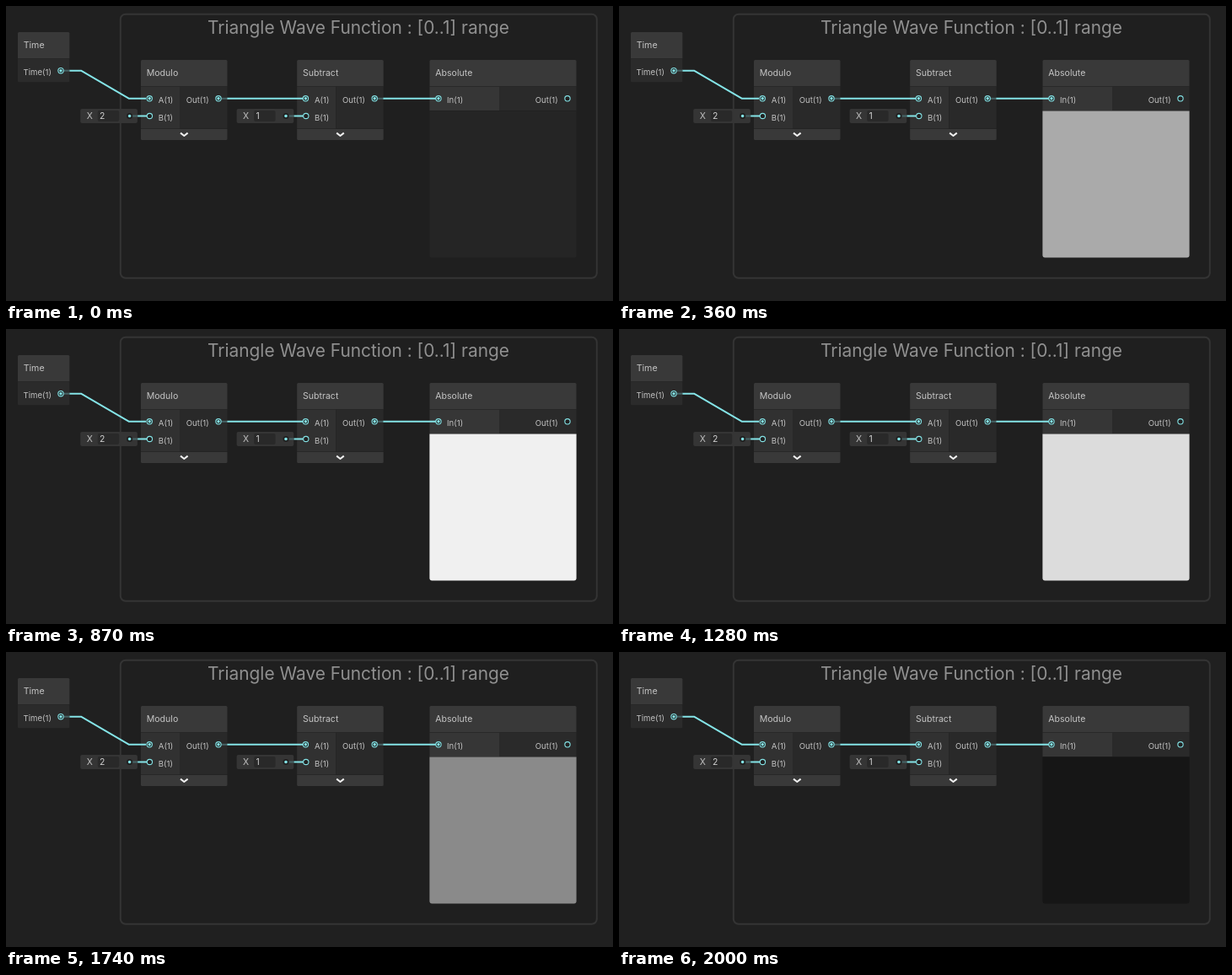
An HTML page with a canvas for the animation above (2.05 s loop, 720 by 350 pixels).

```html
<!DOCTYPE html>
<html lang="en">
<head>
<meta charset="utf-8">
<title>Triangle wave node graph</title>
<style>
html, body { margin: 0; width: 100%; height: 100%; overflow: hidden; background: #202020; }
canvas { display: block; width: 720px; height: 350px; }
</style>
</head>
<body>
<canvas id="stage" width="720" height="350"></canvas>
<script>
const ctx = document.getElementById('stage').getContext('2d');
const LOOP = 2050;
const CYAN = '#84e4e7', DIM = '#456264', HEAD = '#393939', LEFT = '#313131', RIGHT = '#292929';

// The preview holds each grey level until the next step: [start ms, grey].
const steps = [
  [0, 37], [50, 68], [150, 113], [250, 138], [300, 155], [350, 170], [460, 186],
  [560, 201], [720, 220], [870, 240], [1280, 220], [1430, 201], [1480, 186],
  [1590, 170], [1640, 155], [1740, 138], [1840, 113], [1950, 66], [2000, 22]
];

function box(x, y, w, h, fill, radius = 0) {
  ctx.fillStyle = fill;
  ctx.beginPath();
  ctx.roundRect(x, y, w, h, radius);
  ctx.fill();
}

function line(color, width, ...pts) {
  ctx.strokeStyle = color;
  ctx.lineWidth = width;
  ctx.lineJoin = 'round';
  ctx.beginPath();
  for (let i = 0; i < pts.length; i += 2) ctx.lineTo(pts[i], pts[i + 1]);
  ctx.stroke();
}

function disc(x, y, r, fill) {
  ctx.fillStyle = fill;
  ctx.beginPath();
  ctx.arc(x, y, r, 0, Math.PI * 2);
  ctx.fill();
}

function label(str, x, y, size = 9.6, color = '#c2c2c2', align = 'left') {
  ctx.font = `${size}px Inter, sans-serif`;
  ctx.fillStyle = color;
  ctx.textAlign = align;
  ctx.fillText(str, x, y);
}

function port(x, y, linked) {
  disc(x, y, 3.7, CYAN);
  disc(x, y, 2.6, '#212121');
  if (linked) disc(x, y, 1.7, CYAN);
}

function header(title, x, y, w) {
  box(x, y, w, 31.3, HEAD, [1.5, 1.5, 0, 0]);
  label(title, x + 6.7, y + 19.3, 10.6, '#c4c4c4');
}

function group() {
  ctx.beginPath();
  ctx.roundRect(135.8, 9.8, 565, 313, 6);
  ctx.fillStyle = '#1f1f1f';
  ctx.fill();
  ctx.strokeStyle = '#343434';
  ctx.lineWidth = 2;
  ctx.stroke();
  label('Triangle Wave Function : [0..1] range', 418, 33, 20.9, '#909090', 'center');
}

function timeNode() {
  header('Time', 14, 31, 61.3);
  box(14, 62.8, 61.3, 27.5, '#2b2b2b', [0, 0, 1.5, 1.5]);
  label('Time(1)', 20.6, 82);
}

function mathNode(title, x) {
  header(title, x, 64, 102.5);
  box(x, 95.8, 46, 49.6, LEFT);
  box(x + 46, 95.8, 56.5, 49.6, RIGHT);
  box(x, 146, 102.5, 13, HEAD, [0, 0, 1.5, 1.5]);
  line('#f0f0f0', 2, x + 47, 150.6, x + 51.3, 154, x + 55.6, 150.6);
  label('A(1)', x + 20.8, 115);
  label('B(1)', x + 20.8, 135.8);
  label('Out(1)', x + 53.7, 115);
}

function valueBox(value, x) {
  box(x, 122, 67.7, 17, '#353535', 2);
  box(x + 20.6, 124, 25.4, 13, '#292929', 2);
  label('X', x + 7.5, 134.3, 10.4);
  label(value, x + 22.8, 134.3, 10.4, '#d2d2d2');
  line(DIM, 2, x + 59, 130.5, x + 68, 130.5);
  line(CYAN, 2, x + 68, 130.5, x + 79, 130.5);
  disc(x + 58.4, 130.5, 3.6, '#212121');
  disc(x + 58.4, 130.5, 1.8, CYAN);
  port(x + 82.2, 130.5, false);
}

function absoluteNode(grey) {
  header('Absolute', 502.5, 64, 174);
  box(502.5, 95.8, 82.5, 28.2, '#363636');
  box(585, 95.8, 91.5, 28.2, '#2a2a2a');
  label('In(1)', 523, 115);
  label('Out(1)', 627.7, 115);
  box(502.4, 124.4, 174.2, 174.2, `rgb(${grey},${grey},${grey})`, [0, 0, 3, 3]);
}

function wires() {
  line(DIM, 2, 65, 76.7, 76, 76.7);
  line(CYAN, 2, 75.5, 76.7, 89, 76.7, 146, 109.8, 166, 109.8);
  line(DIM, 2, 252, 109.8, 263, 109.8);
  line(CYAN, 2, 262.5, 109.8, 352, 109.8);
  line(DIM, 2, 437, 109.8, 448, 109.8);
  line(CYAN, 2, 447.5, 109.8, 510, 109.8);
  port(65, 76.7, true);
  for (const x of [170.2, 252, 355.4, 437.2, 513]) port(x, 109.8, true);
  port(666, 109.8, false);
}

function draw(t) {
  const grey = steps.findLast(([start]) => start <= t)[1];
  box(0, 0, 720, 350, '#202020');
  group();
  timeNode();
  mathNode('Modulo', 160);
  mathNode('Subtract', 345.2);
  absoluteNode(grey);
  valueBox('2', 88.2);
  valueBox('1', 273.6);
  wires();
}

const begin = performance.now();
function tick() {
  draw((performance.now() - begin) % LOOP);
  requestAnimationFrame(tick);
}
tick();
</script>
</body>
</html>
```
